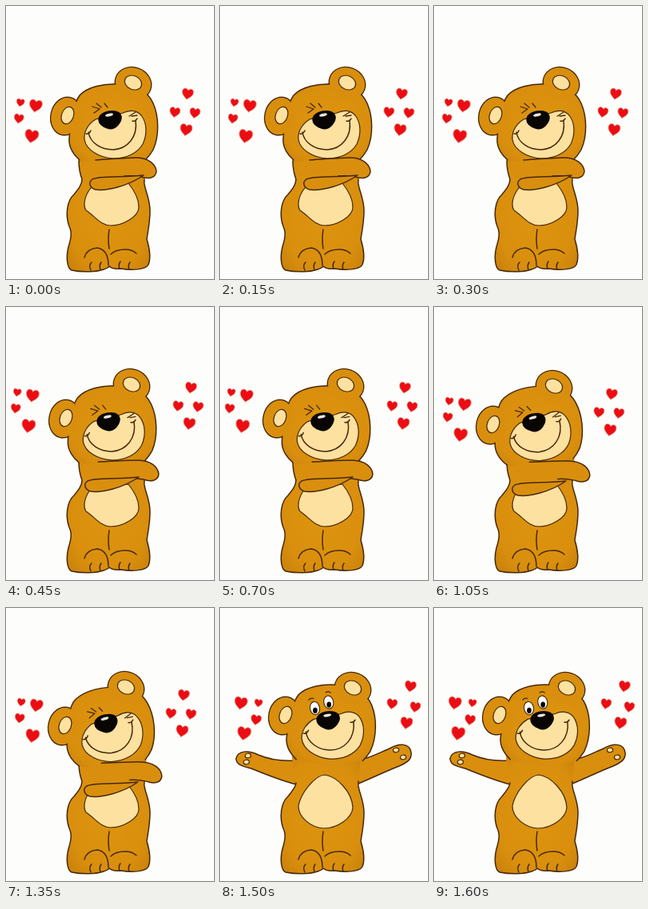
An HTML page for the animation above (1650 ms loop, 260 px wide and 342 px high).

```html
<!DOCTYPE html>
<html lang="en">
<head>
<meta charset="utf-8">
<title>Bear hug</title>
<style>
  html, body { margin: 0; width: 100%; height: 100%; overflow: hidden; background: #fdfefb; }
  svg { display: block; width: 260px; height: 342px; }
  .line { fill: none; }
  .fur { fill: url(#fur); }
  .flat { fill: #d98f0d; }
  .cream { fill: #fce1a0; stroke-width: 1.2; }
  .heart { fill: #ec0d14; stroke: #e8a08c; stroke-width: .05; }
</style>
</head>
<body>
<svg id="stage" viewBox="0 0 260 342" stroke="#47280a" stroke-width="1.5" stroke-linecap="round" stroke-linejoin="round">
  <defs>
    <radialGradient id="fur" r=".8">
      <stop offset="0" stop-color="#dd940e"/>
      <stop offset=".6" stop-color="#d98f0d"/>
      <stop offset="1" stop-color="#be780a"/>
    </radialGradient>
  </defs>
</svg>
<script>
const LOOP = 1650;

// Each pose: start time, head shift and turn, ear centres, heart cluster shifts, arm and hand shifts.
const poses = [
  { at: 0,    head: [0, 0, 0],   ears: [75, 138, 159, 97],  left: [0, 0],    right: [0, 0],   arm: [0, 0, 0], hand: [0, 0] },
  { at: 400,  head: [-2, 1, -1], ears: [73, 140, 157, 98],  left: [-4, -14], right: [4, -9],  arm: [3, 1, 1], hand: [-6, 1] },
  { at: 900,  head: [-5, 2, -5], ears: [72, 148, 150, 100], left: [1, -3],   right: [-5, -1], arm: [7, 1, 2], hand: [-7, 6] },
  { at: 1400, head: [5, -2, 2],  ears: [80, 135, 166, 101], open: true }
];

const leftHearts = [[18, 121, 10], [37, 125, 16], [16, 141, 12], [32, 163, 17]];
const rightHearts = [[227, 110, 14], [211, 133, 13], [236, 134, 13], [225, 155, 15]];
const openHearts = [[26, 119, 16], [48, 119, 10], [45, 140, 13], [30, 157, 17],
  [238, 98, 14], [215, 120, 13], [244, 124, 13], [233, 144, 15]];

const path = (cls, d, extra = "") => `<path class="${cls}" d="${d}" ${extra}/>`;
const fill = (cls, d) => path(cls, d, 'stroke="none"');
const oval = (cls, x, y, rx, ry, turn = 0, extra = "") =>
  `<ellipse class="${cls}" cx="${x}" cy="${y}" rx="${rx}" ry="${ry}" transform="rotate(${turn} ${x} ${y})" ${extra}/>`;
const group = (transform, inner) => `<g transform="${transform}">${inner}</g>`;

const heart = ([x, y, size]) => group(`translate(${x} ${y}) rotate(10) scale(${size})`,
  path("heart", "M0 .5C-.22 .32 -.5 .14 -.5 -.16C-.5 -.54 -.1 -.54 0 -.3C.1 -.54 .5 -.54 .5 -.16C.5 .14 .22 .32 0 .5Z"));

function hearts({ left, right, open }) {
  if (open) return openHearts.map(heart).join("");
  const side = (list, [dx, dy]) => list.map(([x, y, s]) => heart([x + dx, y + dy, s])).join("");
  return side(leftHearts, left) + side(rightHearts, right);
}

function body(open) {
  const outline = "C95 224 90 230 85 236C76 244 74 262 79 276C83 284 81 292 78 302C75 314 76 328 82 331"
    + "C96 334 114 333 122 330Q128 328 129 326Q133 330 143 329C156 331 174 331 178 324C182 314 179 302 176 292"
    + "C177 284 180 272 180 256C180 246 177 238 174 228Q172 222 173 217";
  const belly = open
    ? "M131 209C146 211 165 230 166 250C165 264 146 276 130 276C113 275 98 262 98 248C101 232 118 210 131 209Z"
    : "M106 228C98 238 96 250 100 256C110 262 118 275 131 275C146 275 166 264 166 252C166 242 161 232 153 222Z";
  return fill("fur", `M90 186Q91 206 95 217${outline}L176 184Z`)
    + path("line", (open ? "M95 219" : "M91 194Q91 206 95 217") + outline)
    + path("cream", belly)
    + path("line", "M129 280Q127 292 129 304M98 315Q101 304 114 303Q128 305 128 325M131 311Q137 305 149 305Q158 305 163 310M106 331Q103 325 107 321M118 330Q116 325 119 321M142 329Q140 324 143 320M154 330Q152 325 155 321");
}

function openArms() {
  const left = "M94 191C78 192 62 190 48 184C36 178 22 178 20 189C21 197 28 198 39 201C56 208 76 216 95 221";
  const right = "M176 190C190 187 202 180 212 176C224 169 237 169 239 181C240 190 233 194 224 198C206 205 190 213 173 220";
  return fill("flat", left + "L120 200Z") + fill("flat", right + "L150 200Z") + path("line", left + right)
    + [[35, 185], [33, 193], [220, 178], [229, 187]].map(([x, y]) => oval("cream", x, y, 3.6, 2.8, -10)).join("");
}

function hugArms({ arm: [x, y, turn], hand: [hx, hy] }) {
  const upper = "M112 193C130 192 150 190 162 190C178 190 187 198 188 207C187 216 178 217 169 214";
  return group(`translate(${x} ${y}) rotate(${turn} 108 203)`,
      fill("flat", upper + "C150 211 125 213 108 219L97 212L98 196Z") + path("line", upper + "Q158 212 148 213"))
    + group(`translate(${hx} ${hy})`,
      path("flat", "M172 212C150 215 116 212 108 217C102 221 105 228 112 230C125 232 152 226 172 212Z"));
}

// Ear rims sit behind the head; their fill covers the seam.
const rims = ([lx, ly, rx, ry]) => oval("flat", lx, ly, 19, 24, 12) + oval("flat", rx, ry, 23, 20, 20);
const ears = ([lx, ly, rx, ry]) =>
  oval("flat", lx, ly, 18.3, 23.3, 12, 'stroke="none"') + oval("cream", lx + 2, ly - 1, 7.5, 11, 20)
  + oval("flat", rx, ry, 22.3, 19.3, 20, 'stroke="none"') + oval("cream", rx, ry - 1, 11, 8.5, 25);

const squint = path("line", "M108 126L117 129L110 134M113 122L119 127M154 138L162 133M157 138L164 137M123 122L127 127", 'stroke-width="1.3"');
const wideEyes = [[113, 128], [130, 120]].map(([x, y]) =>
  oval("", x, y, 6, 8.2, -12, 'fill="#fff" stroke-width="1.1"')
  + oval("", x + .5, y + 3, 2.8, 3.6, 0, 'fill="#000" stroke="none"')).join("")
  + path("line", "M105 118Q107 115 111 116M126 108Q129 106 132 108", 'stroke-width="1.2"');

function head({ head: [x, y, turn], open, ears: spots }) {
  const skull = "M92 193C86 188 78 178 79 166C80 150 82 126 92 112C102 101 122 97 142 98C163 99 177 106 184 122C191 138 192 162 184 180Q180 187 175 192";
  const move = inner => group(`translate(${x} ${y}) rotate(${turn} 130 143)`, inner);
  return rims(spots)
    + move(fill("fur", skull + "Q134 204 92 193Z") + path("line", skull))
    + ears(spots)
    + move(path("cream", "M112 142C124 138 138 136 146 134C154 130 163 130 169 137C176 146 177 160 171 173C164 185 150 191 134 191C116 190 100 180 98 167C97 156 104 147 112 142Z")
      + path("line", "M103 158C105 171 118 180 134 180C152 179 165 164 162 143M100 160Q104 161 106 156M158 144Q162 145 164 141")
      + (open ? wideEyes : squint)
      + path("", "M116 142C117 134 127 131 136 132C144 133 146 140 142 146C138 153 132 155 127 153C121 151 116 147 116 142Z", 'fill="#080503" stroke="#080503"')
      + oval("", 129, 136.5, 5, 1.8, -12, 'fill="#e9e6df" stroke="none"'));
}

const stage = document.getElementById("stage");
const layers = poses.map(pose => {
  const layer = document.createElementNS("http://www.w3.org/2000/svg", "g");
  layer.innerHTML = hearts(pose)
    + (pose.open ? openArms() : "")
    + body(pose.open)
    + head(pose)
    + (pose.open ? "" : hugArms(pose));
  stage.append(layer);
  return layer;
});

function draw(now) {
  const t = now % LOOP;
  const current = poses.findLastIndex(pose => t >= pose.at);
  layers.forEach((layer, i) => layer.style.display = i === current ? "" : "none");
}

const start = performance.now();
function tick() {
  draw(performance.now() - start);
  requestAnimationFrame(tick);
}
tick();
</script>
</body>
</html>
```
